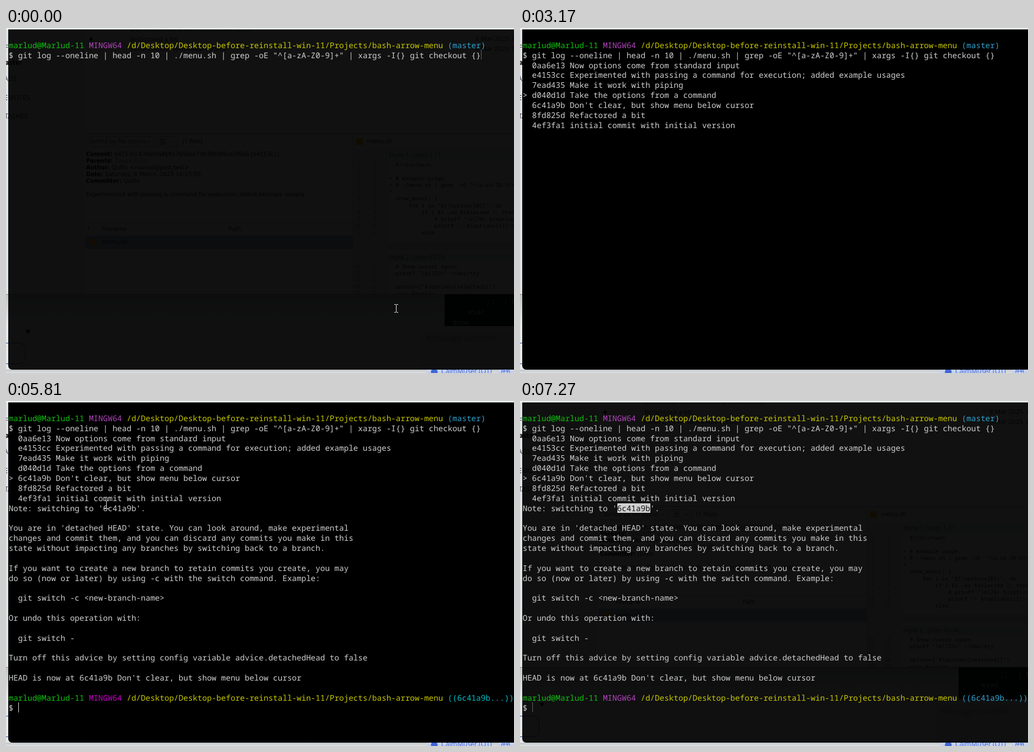
These frames come from a looping animation (908x617 px, 7.41 s). An HTML page with a canvas:

```html
<!DOCTYPE html>
<html lang="en">
<head>
<meta charset="utf-8">
<title>Terminal menu</title>
<style>
  html, body { margin: 0; width: 100%; height: 100%; overflow: hidden; background: #dfe3e6; }
  canvas { display: block; }
</style>
</head>
<body>
<canvas id="stage" width="908" height="617"></canvas>
<script>
const W = 908, H = 617, LOOP = 7410;
const FOCUS = 430, BLUR = 7270;
const CELL = 8.44, LINE = 17.85, LEFT = 4.7, TOP = 21.4, ASCENT = 14.5;
const MONO = '"Noto Sans Mono", "DejaVu Sans Mono", monospace';
const SANS = '"Open Sans", "Noto Sans", sans-serif';
const WIDE = '"DejaVu Sans", sans-serif';
const FG = '#d0d0d0';

const stage = document.getElementById('stage').getContext('2d');
stage.textRendering = 'geometricPrecision';

const PATH = '/d/Desktop/Desktop-before-reinstall-win-11/Projects/bash-arrow-menu';
const COMMAND = '$ git log --oneline | head -n 10 | ./menu.sh | grep -oE "^[a-zA-Z0-9]+" | xargs -I{} git checkout {}';
const MENU = [
  "0aa6e13 Now options come from standard input",
  "e4153cc Experimented with passing a command for execution; added example usages",
  "7ead435 Make it work with piping",
  "d040d1d Take the options from a command",
  "6c41a9b Don't clear, but show menu below cursor",
  "8fd825d Refactored a bit",
  "4ef3fa1 initial commit with initial version"
];
const OUTPUT = [
  "Note: switching to '6c41a9b'.",
  "",
  "You are in 'detached HEAD' state. You can look around, make experimental",
  "changes and commit them, and you can discard any commits you make in this",
  "state without impacting any branches by switching back to a branch.",
  "",
  "If you want to create a new branch to retain commits you create, you may",
  "do so (now or later) by using -c with the switch command. Example:",
  "",
  "  git switch -c <new-branch-name>",
  "",
  "Or undo this operation with:",
  "",
  "  git switch -",
  "",
  "Turn off this advice by setting config variable advice.detachedHead to false",
  "",
  "HEAD is now at 6c41a9b Don't clear, but show menu below cursor"
];

// [time, row] of the ">" marker; row 0 hides it
const MARKER = [[1670, 2], [2380, 0], [2450, 3], [2780, 4], [3170, 5], [3540, 6]];

// [time, row, column] of the caret; row -1 hides it
const CARET = [
  [0, 1, 100], [1050, -1], [1440, 2, 0], [1670, -1], [4100, 9, 0], [4250, 9, 1],
  [4340, 27, 0], [5340, 29, 2], [5850, -1], [6370, 29, 2], [6890, -1], [BLUR, 29, 2]
];

// Pointer paths: [time, x, y]; hidden outside each path
const POINTER = [
  [[0, 697, 501], [70, 697, 501], [430, 553, 380], [1440, 553, 380]],
  [[5190, 551, 379], [5270, 551, 379], [5620, 200, 140], [5880, 175, 194], [5960, 175, 194],
   [6190, 230, 194], [6420, 230, 194], [6980, 850, 626]]
];
const PRESSES = [[430, 590], [5960, 6420]];

const during = (t, a, b) => t >= a && t < b;

function latest(steps, t) {
  let found = null;
  for (const step of steps) if (t >= step[0]) found = step;
  return found;
}

function pointerAt(t) {
  for (const path of POINTER) {
    for (let i = 1; i < path.length; i++) {
      const [t0, x0, y0] = path[i - 1], [t1, x1, y1] = path[i];
      if (!during(t, t0, t1)) continue;
      const k = (t - t0) / (t1 - t0), e = k * k * (3 - 2 * k);
      return [x0 + (x1 - x0) * e, y0 + (y1 - y0) * e];
    }
  }
  return null;
}

function box(c, x, y, w, h, fill) {
  c.fillStyle = fill;
  c.fillRect(x, y, w, h);
}

function outline(c, x, y, w, h, r, stroke, fill) {
  c.beginPath();
  c.roundRect(x + .5, y + .5, w, h, r);
  if (fill) { c.fillStyle = fill; c.fill(); }
  if (stroke) { c.strokeStyle = stroke; c.lineWidth = 1; c.stroke(); }
}

function label(c, text, x, y, font, color = '#222', align = 'left') {
  c.font = font;
  c.fillStyle = color;
  c.textAlign = align;
  c.textBaseline = 'middle';
  c.fillText(text, x, y);
}

function chevron(c, x, y) {
  c.strokeStyle = '#444';
  c.beginPath();
  c.moveTo(x - 3, y - 1.5);
  c.lineTo(x, y + 1.5);
  c.lineTo(x + 3, y - 1.5);
  c.stroke();
}

function drawSidebar(c) {
  box(c, 0, 0, 140, 476, '#dfe3e6');
  const font = `12px ${SANS}`;
  label(c, 'F', 4, 36, font, '#445', 'right');
  label(c, 'master', 29, 63, `bold 12px ${SANS}`, '#000', 'right');
  label(c, 'TAGS', 19, 92, font, '#334', 'right');
  label(c, 'REMOTES', 43, 126, font, '#334', 'right');
  label(c, 'STASHES', 39, 159, font, '#334', 'right');
}

function drawHistory(c) {
  box(c, 140, 0, 768, 188, '#f4f6f6');
  const font = `11.5px ${SANS}`;
  ["Don't clear, but show menu below cursor", 'Refactored a bit', 'initial commit with initial version']
    .forEach((text, i) => label(c, text, 222, 3 + i * 17.5, font));
  label(c, '8 Mar 2025 14:21', 839, 20, font);
  label(c, '8 Mar 2025 12:40', 839, 38, font);
  c.fillStyle = '#222';
  c.beginPath();
  c.arc(152, 20, 3, 0, 7);
  c.fill();
  box(c, 140, 188, 768, 2, '#c8ccd0');
}

function drawDetails(c) {
  box(c, 140, 190, 481, 286, '#eef0f1');
  outline(c, 142, 194, 122, 18, 2, '#aaa');
  outline(c, 268, 194, 38, 18, 2, '#aaa');
  label(c, 'Sorted by file status', 148, 203, `11px ${SANS}`, '#444');
  chevron(c, 255, 203);
  for (let i = 0; i < 4; i++) box(c, 275, 198 + i * 3, 10, 1, '#333');
  chevron(c, 299, 203);
  label(c, '(1 files)', 315, 203, `11px ${SANS}`);

  const rows = [
    ['Commit:', 'e4153cc43debfa4b9a7b50ec7dd38e9f6ce3f6b6 [e4153cc]'],
    ['Parents:', '7ead4355af'],
    ['Author:', 'Quillo <marlud@post.test>'],
    ['Date:', 'Saturday, 8 March, 2025 16:15:09'],
    ['Committer:', 'Quillo']
  ];
  rows.forEach(([key, value], i) => {
    const y = 226 + i * 12.1;
    label(c, key, 143, y, `bold 10px ${WIDE}`, '#000');
    const x = 143 + c.measureText(key + ' ').width;
    label(c, value, x, y, `10px ${WIDE}`, i === 1 ? '#7b8794' : '#222');
  });
  label(c, 'Experimented with passing a command for execution; added example usages', 143, 298, `10px ${WIDE}`);

  box(c, 141, 347, 479, 1, '#bbb');
  label(c, '?', 145, 360, `10.5px ${SANS}`);
  label(c, 'Filename', 171, 360, `10.5px ${SANS}`);
  label(c, 'Path', 398, 360, `10.5px ${SANS}`);
  box(c, 141, 371, 479, 24, '#a4bccf');
  box(c, 150, 377, 12, 12, '#e0b030');
  label(c, 'menu.sh', 171, 383, `11.5px ${SANS}`);
}

function drawDiff(c) {
  box(c, 621, 190, 287, 286, '#f0f2f2');
  box(c, 620, 190, 1, 286, '#bbb');
  box(c, 626, 197, 12, 12, '#f0b020');
  label(c, 'menu.sh', 645, 203, `11px ${SANS}`);
  box(c, 621, 217, 62, 259, '#e2e5e7');
  box(c, 683, 217, 225, 21, '#dcdfe2');
  box(c, 683, 383, 225, 14, '#cfd3d6');
  box(c, 683, 403, 225, 15, '#dcdfe2');
  label(c, 'Hunk 1 : Lines 1-11', 685, 228, `10.5px ${SANS}`, '#555');
  label(c, 'Hunk 2 : Lines 55-74', 685, 411, `10.5px ${SANS}`, '#555');

  const code = [
    '  #!/bin/bash', '', '+ # example usage:', '+ # ./menu.sh | grep -oE "^[a-zA-Z0-9]+"', '+',
    '  show_menu() {', '      for i in "${!options[@]}"; do', '          if [ $i -eq $selected ]; then',
    '              # printf "\\e[7m> ${options[i]}', '              printf "> ${options[i]}\\n"',
    '          else', '', '', '', '',
    '  # Show cursor again', '  printf "\\e[?25h" >/dev/tty', '', '  option=("${options[selected]}")',
    '  echo $option'
  ];
  const font = `9.6px ${MONO}`;
  code.forEach((text, i) => {
    const y = 245 + i * 12.15;
    label(c, text, 685, y, font);
    if (i > 10 && i < 15) return;
    const n = i < 11 ? i + 1 : i + 40;
    label(c, n, 633, y, `8px ${MONO}`, '#888', 'right');
    label(c, n, 662, y, `8px ${MONO}`, '#888', 'right');
  });
}

function drawChat(c) {
  const shade = c.createLinearGradient(0, 476, 0, 530);
  shade.addColorStop(0, '#c2c6c9');
  shade.addColorStop(1, '#e6e9eb');
  box(c, 0, 476, W, 54, shade);
  box(c, 0, 530, W, 87, '#e6e9eb');
  box(c, 0, 476, W, 1, '#888');
  outline(c, -20, 563, 54, 37, 10, '#2c4f9e');
  c.fillStyle = '#222';
  c.beginPath();
  c.moveTo(34, 540);
  c.lineTo(44, 540);
  c.lineTo(39, 547);
  c.fill();

  box(c, 784, 476, 124, 57, '#06140a');
  label(c, ';;  | break', 858, 489, `13px ${MONO}`, '#8fd08f');
  label(c, 'esac', 825, 508, `13px ${MONO}`, '#8fd08f');
  label(c, 'done', 797, 527, `13px ${MONO}`, '#8fd08f');

  outline(c, 741, 540, 200, 100, 14, null, '#d4d8dd');
  label(c, 'Message NordSift', 752, 556, `15px ${SANS}`, '#85898f');

  const edge = c.createLinearGradient(0, 611, 0, 617);
  edge.addColorStop(0, '#bfc3c6');
  edge.addColorStop(1, '#dfe3e6');
  box(c, 0, 611, W, 6, edge);
  outline(c, 751, 606, 117, 26, 10, null, '#c6d2ee');
  outline(c, 878, 606, 60, 26, 10, null, '#c6d2ee');
  c.fillStyle = '#4166d5';
  c.beginPath();
  c.arc(765.5, 615, 6, 0, 7);
  c.fill();
  label(c, 'CalmMuser (Q1)', 778, 615, `12px ${SANS}`, '#4166d5');
  c.strokeStyle = '#4166d5';
  c.beginPath();
  c.arc(893, 615, 7, 0, 7);
  c.moveTo(886, 613.5);
  c.lineTo(900, 613.5);
  c.moveTo(896, 615);
  c.ellipse(893, 615, 3, 7, 0, 0, 7);
  c.stroke();
}

function makeDesktop() {
  const layer = document.createElement('canvas');
  layer.width = W;
  layer.height = H;
  const c = layer.getContext('2d');
  [drawSidebar, drawHistory, drawDetails, drawDiff, drawChat].forEach(draw => draw(c));
  return layer;
}
const desktop = makeDesktop();

// Terminal text sits on a fixed character grid
function put(row, col, text, color = FG) {
  stage.font = `14.07px ${MONO}`;
  stage.fillStyle = color;
  stage.textAlign = 'left';
  stage.textBaseline = 'alphabetic';
  const y = Math.round(TOP + row * LINE + ASCENT);
  for (let i = 0; i < text.length; i++) {
    if (text[i] !== ' ') stage.fillText(text[i], LEFT + (col + i) * CELL, y);
  }
}

function prompt(row, branch, soft) {
  put(row, 0, 'marlud@Marlud-11', '#10c010');
  put(row, 17, 'MINGW64', soft ? '#b044ba' : '#c400c4');
  put(row, 25, PATH, '#c8c800');
  put(row, 93, branch, soft ? '#30a4d0' : '#00c0c8');
}

function drawSelection(t, pointer) {
  if (t < 5960) return;
  const reach = t < 6190 && pointer ? (pointer[0] - 174) / CELL : 7;
  const count = Math.max(0, Math.min(7, Math.round(reach)));
  box(stage, 174, 183, Math.round(count * CELL), 17, '#d0d0d0');
  put(9, 20, '6c41a9b'.slice(0, count), '#111');
}

function drawCaret(t, focused) {
  const [, row, col] = latest(CARET, t);
  if (row < 0) return;
  const x = Math.round(LEFT + col * CELL), y = Math.round(TOP + row * LINE);
  if (focused) return box(stage, x, y, 1, 18, '#d8d8d8');
  for (let i = 0; i < 18; i += 2) box(stage, x, y + i, 1, 1, '#b0b0b0');
}

function drawPointer(t, [x, y]) {
  x = Math.round(x);
  y = Math.round(y);
  if (PRESSES.some(([a, b]) => during(t, a, b))) {
    stage.fillStyle = 'rgba(255,240,0,.5)';
    stage.beginPath();
    stage.arc(x + .5, y + .5, 11.3, 0, 7);
    stage.fill();
  }
  const ink = '#e4e4e4';
  box(stage, x, y - 6, 1, 13, ink);
  for (const end of [y - 7, y + 7]) {
    box(stage, x - 3, end, 3, 1, ink);
    box(stage, x + 1, end, 3, 1, ink);
  }
}

function draw(t) {
  const focused = during(t, FOCUS, BLUR);
  const pointer = pointerAt(t);
  stage.drawImage(desktop, 0, 0);
  box(stage, 0, 0, W, 3, '#eef3f0');
  stage.beginPath();
  stage.roundRect(4, 2.5, W + 20, 608.5, [0, 0, 0, 7]);
  stage.fillStyle = focused ? '#000' : 'rgba(0,0,0,.93)';
  stage.fill();

  prompt(0, '(master)', true);
  put(1, 0, COMMAND);
  if (t >= 1670) {
    MENU.forEach((text, i) => put(2 + i, 2, text));
    const row = latest(MARKER, t)[1];
    if (row) put(row, 0, '>');
  }
  if (t >= 4340) OUTPUT.forEach((text, i) => put(9 + i, 0, text));
  else if (t >= 4250) put(9, 0, 'N');
  if (t >= 5340) {
    prompt(28, '((6c41a9b...))', !focused);
    put(29, 0, '$');
  }
  drawSelection(t, pointer);
  drawCaret(t, focused);
  if (pointer) drawPointer(t, pointer);
}

const start = performance.now();
function tick() {
  draw((performance.now() - start) % LOOP);
  requestAnimationFrame(tick);
}
tick();
</script>
</body>
</html>
```
